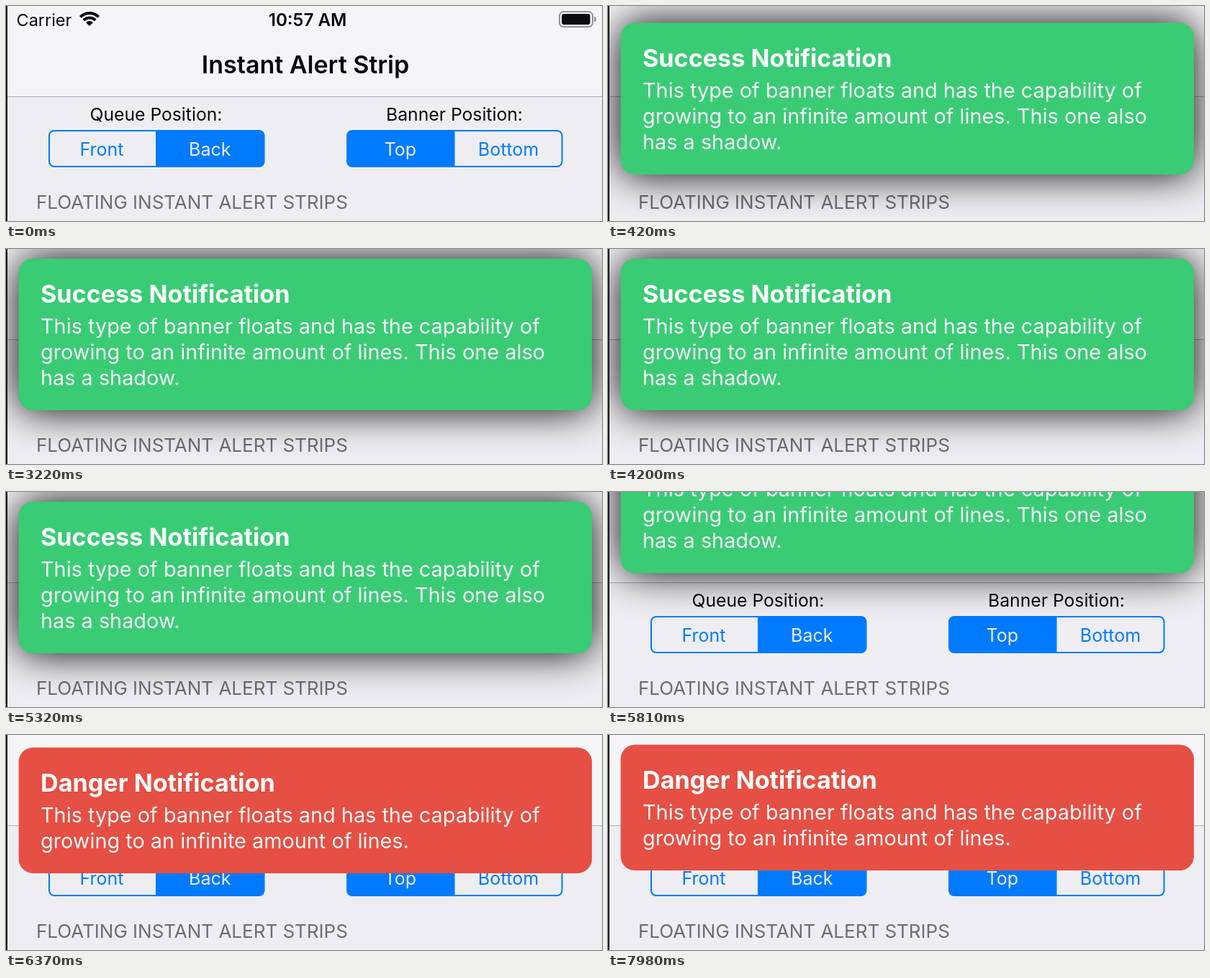
An HTML page with a canvas that plays this animation: 828x300 px, repeating every 8 s.

```html
<!DOCTYPE html>
<html lang="en">
<head>
<meta charset="utf-8">
<title>Floating alerts</title>
<style>
  html, body { margin: 0; width: 100%; height: 100%; overflow: hidden; background: #eeeef2; }
  canvas { display: block; width: 828px; height: 300px; }
</style>
</head>
<body>
<canvas id="stage" width="828" height="300"></canvas>
<script>
const ctx = document.getElementById('stage').getContext('2d');
const LOOP = 8000, STEP = 70;
const BLUE = '#007aff', PAPER = '#eeeef2', INK = '#0a0a0c';
const REST_Y = 13.5;
const SLIDE = 490; // length of the way out, ms

const banners = [
  {
    color: '#39cc75', height: 211.5, start: 188, leave: 5566, shadow: true,
    title: 'Success Notification',
    lines: [
      'This type of banner floats and has the capability of',
      'growing to an infinite amount of lines. This one also',
      'has a shadow.'
    ]
  },
  {
    color: '#e64f43', height: 175.5, start: 6074, leave: Infinity, shadow: false,
    title: 'Danger Notification',
    lines: [
      'This type of banner floats and has the capability of',
      'growing to an infinite amount of lines.'
    ]
  }
];

function text(str, x, y, size, color, weight = 400, align = 'left') {
  ctx.font = `${weight} ${size}px Inter, Roboto, sans-serif`;
  ctx.fillStyle = color;
  ctx.textAlign = align;
  ctx.fillText(str, x, y);
}

function rect(x, y, w, h, color) {
  ctx.fillStyle = color;
  ctx.fillRect(x, y, w, h);
}

function roundPath(x, y, w, h, r) {
  ctx.beginPath();
  ctx.roundRect(x, y, w, h, r);
}

function roundFill(x, y, w, h, r, color) {
  roundPath(x, y, w, h, r);
  ctx.fillStyle = color;
  ctx.fill();
}

// Underdamped spring from 0 to 1, t in seconds
function spring(t) {
  const damping = 0.7, omega = 20.1;
  const root = Math.sqrt(1 - damping * damping);
  const a = omega * root * t;
  return 1 - Math.exp(-damping * omega * t) * (Math.cos(a) + damping / root * Math.sin(a));
}

// cubic-bezier(.42, 0, .58, 1)
function easeInOut(x) {
  if (x <= 0) return 0;
  if (x >= 1) return 1;
  let lo = 0, hi = 1, s = 0.5;
  for (let i = 0; i < 24; i++) {
    s = (lo + hi) / 2;
    const bx = 3 * s * (1 - s) * (1 - s) * 0.42 + 3 * s * s * (1 - s) * 0.58 + s * s * s;
    if (bx < x) lo = s; else hi = s;
  }
  return s * s * (3 - 2 * s);
}

function drawWifi(x, y) {
  const from = -Math.PI * 0.75, to = -Math.PI * 0.25;
  ctx.strokeStyle = ctx.fillStyle = INK;
  ctx.lineWidth = 3.9;
  for (const r of [18, 11.6]) {
    ctx.beginPath();
    ctx.arc(x, y, r, from, to);
    ctx.stroke();
  }
  ctx.beginPath();
  ctx.moveTo(x, y);
  ctx.arc(x, y, 7, from, to);
  ctx.fill();
}

function drawBattery() {
  ctx.strokeStyle = '#949497';
  ctx.lineWidth = 2;
  roundPath(769, 8, 46, 21, 5.5);
  ctx.stroke();
  roundFill(772, 11, 39.5, 15, 3, INK);
  roundFill(817, 15, 3, 7, [0, 3, 3, 0], '#949497');
}

function drawStatusBar() {
  text('Carrier', 14.5, 27.5, 23.5, INK);
  drawWifi(116, 28);
  text('10:57 AM', 419, 27.5, 24.2, INK, 600, 'center');
  drawBattery();
}

function drawSegments(x, split, labels, picked) {
  const y = 174, w = 298.5, h = 50;
  const edges = [0, split, w];
  const left = edges[picked];
  roundFill(x + left, y, edges[picked + 1] - left, h, picked ? [0, 7, 7, 0] : [7, 0, 0, 7], BLUE);
  ctx.strokeStyle = BLUE;
  ctx.lineWidth = 2;
  roundPath(x, y, w, h, 7);
  ctx.stroke();
  labels.forEach((label, i) => {
    const mid = x + (edges[i] + edges[i + 1]) / 2;
    text(label, mid - 1 + i, 209, 25, i === picked ? PAPER : BLUE, 400, 'center');
  });
}

function drawPage() {
  rect(0, 0, 828, 300, PAPER);
  rect(0, 0, 828, 126, '#f5f5f8');
  rect(0, 126, 828, 1, '#b0b0b4');
  text('Instant Alert Strip', 416, 94, 34, INK, 600, 'center');
  text('Queue Position:', 208.5, 160, 24.7, INK, 400, 'center');
  text('Banner Position:', 623, 160, 24.7, INK, 400, 'center');
  drawSegments(60, 148, ['Front', 'Back'], 1);
  drawSegments(474, 149.5, ['Top', 'Bottom'], 0);
  text('FLOATING INSTANT ALERT STRIPS', 42, 283, 26, '#6d6d72');
}

function drawBanner(b, t) {
  if (t < b.start || t >= b.leave + SLIDE) return;
  const shown = spring((t - b.start) / 1000) - easeInOut((t - b.leave) / SLIDE);
  const y = -b.height + (REST_Y + b.height) * shown;
  ctx.save();
  if (b.shadow) {
    ctx.shadowColor = '#000';
    ctx.shadowBlur = 56;
  }
  roundFill(17.6, y, 796.4, b.height, 20, b.color);
  ctx.restore();
  text(b.title, 48, y + 61.5, 34.15, '#fff', 700);
  b.lines.forEach((line, i) => text(line, 48, y + 104.5 + i * 35.75, 28.85, '#f6f6f6'));
}

function draw(t) {
  drawPage();
  if (t < banners[0].start) drawStatusBar();
  for (const b of banners) drawBanner(b, t);
  rect(0, 0, 2, 300, '#1c1c1f');
}

const begin = performance.now();
function tick() {
  const t = (performance.now() - begin) % LOOP;
  draw(Math.floor(t / STEP) * STEP);
  requestAnimationFrame(tick);
}
tick();
</script>
</body>
</html>
```
